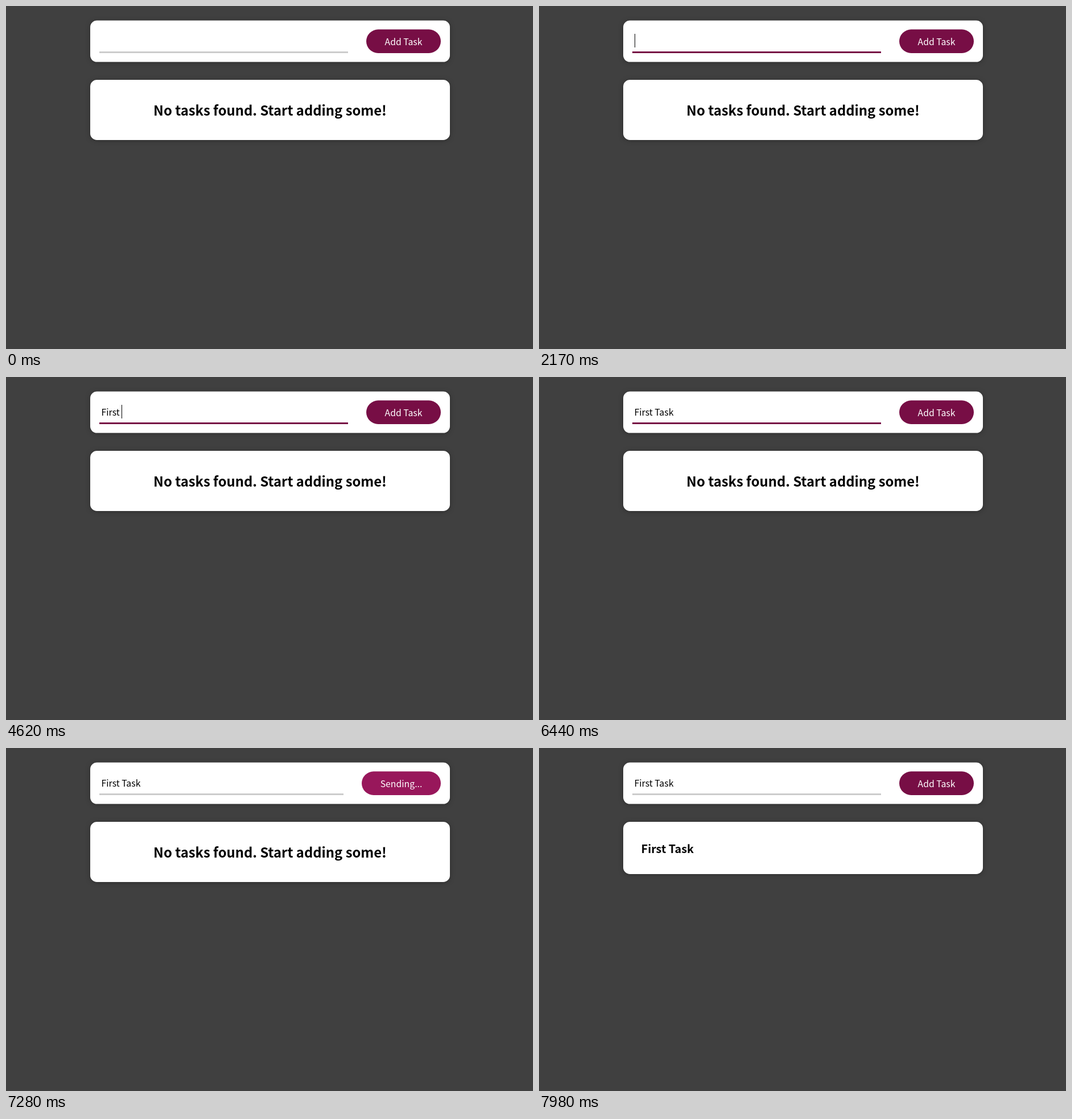
These frames come from a looping animation (926x604 px, 8000 ms). An HTML page:

```html
<!DOCTYPE html>
<html lang="en">
<head>
<meta charset="utf-8">
<title>Task list</title>
<style>
  html, body { margin: 0; width: 100%; height: 100%; overflow: hidden; background: #404040; }
  svg { display: block; width: 926px; height: 604px; }
  text { font: 400 15.8px "Noto Sans CJK JP", "Noto Sans CJK", "Noto Sans", sans-serif; white-space: pre; }
  .card { fill: #fff; filter: drop-shadow(0 1px 4px rgba(0, 0, 0, .3)); }
  .mid { text-anchor: middle; }
  #label { fill: #fff; }
  #empty { font-size: 23.8px; font-weight: 700; }
  #item { font-size: 19.75px; font-weight: 700; }
</style>
</head>
<body>
<svg viewBox="0 0 926 604">
  <rect width="926" height="604" fill="#404040"/>
  <rect class="card" x="148" y="25.6" width="632" height="73" rx="11.8"/>
  <rect class="card" id="list" x="148" y="130" width="632" rx="11.8"/>
  <rect id="line" x="164" y="80" height="3"/>
  <text id="typed" x="167.5" y="68"></text>
  <rect id="caret" y="49" width="1" height="24"/>
  <rect id="button" y="41.3" height="41.6" rx="20.8"/>
  <text id="label" class="mid" y="69"></text>
  <text id="empty" class="mid" x="464" y="193.3">No tasks found. Start adding some!</text>
  <text id="item" x="179.6" y="184.7">First Task</text>
</svg>
<script>
const LOOP = 8000;
const TASK = "First Task";
const KEY_TIMES = [3640, 3850, 4130, 4340, 4480, 4620, 5180, 5460, 5670, 5950];
const FOCUS = 2170, PRESS = 7070, SEND = 7140, DONE = 7350, RELEASE = 7700;
const BLINKS = [[2730, 3220], [6440, 7000]];
const PLUM = "#770e45", BRIGHT = "#98175b", GREY = "#ccc";

const $ = id => document.getElementById(id);
const within = (t, a, b) => t >= a && t < b;
const show = (id, on) => $(id).setAttribute("visibility", on ? "visible" : "hidden");
function set(id, attrs) {
  for (const name in attrs) $(id).setAttribute(name, attrs[name]);
}
function write(id, text) {
  if ($(id).textContent !== text) $(id).textContent = text;
}

function draw(t) {
  const focused = within(t, FOCUS, PRESS);
  const sending = within(t, SEND, DONE);
  const done = t >= DONE;
  const left = sending ? 625 : 633;

  write("typed", TASK.slice(0, KEY_TIMES.filter(k => t >= k).length));
  const advance = $("typed").textContent ? $("typed").getComputedTextLength() : 0;
  set("caret", { x: Math.round(167.5 + advance) });
  show("caret", focused && !BLINKS.some(([a, b]) => within(t, a, b)));

  set("line", { width: left - 32 - 164, fill: focused ? PLUM : GREY });
  set("button", { x: left, width: 764 - left, fill: within(t, PRESS, RELEASE) ? BRIGHT : PLUM });
  set("label", { x: (left + 764) / 2 });
  write("label", sending ? "Sending..." : "Add Task");

  set("list", { height: done ? 92 : 106 });
  show("empty", !done);
  show("item", done);
}

const start = performance.now();
function tick() {
  draw((performance.now() - start) % LOOP);
  requestAnimationFrame(tick);
}
tick();
</script>
</body>
</html>
```
